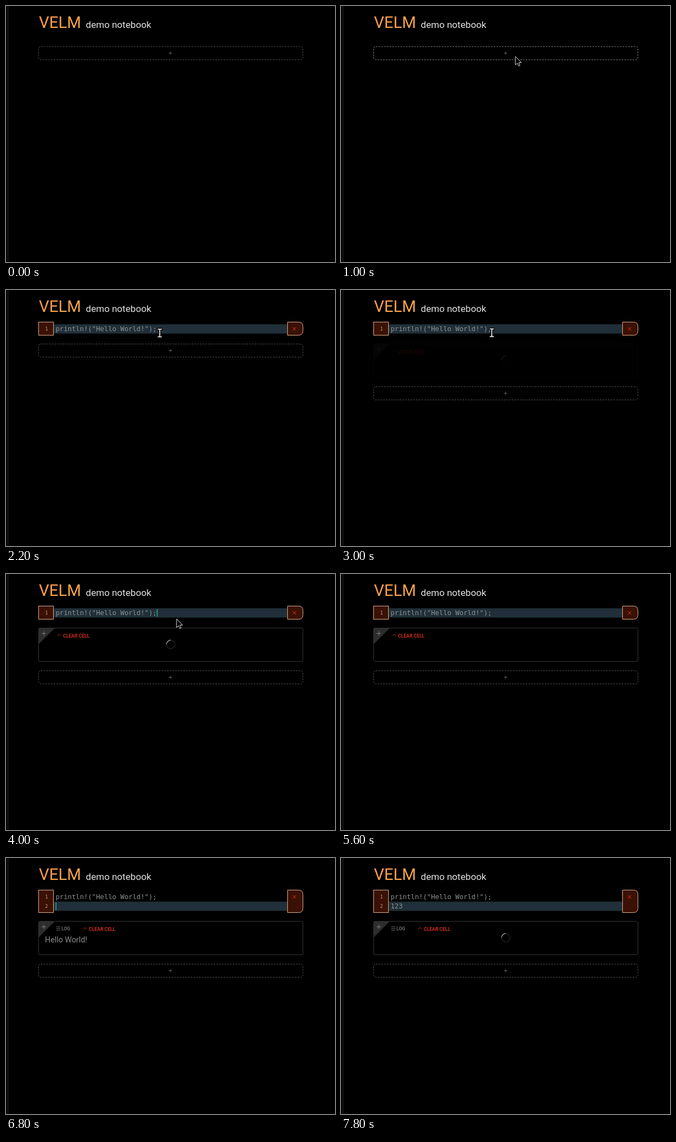
An HTML page for the animation above (8 s loop, 600 px wide and 467 px high).

```html
<!DOCTYPE html>
<html lang="en">
<head>
<meta charset="utf-8">
<title>Demo notebook</title>
<style>
  html, body { margin: 0; width: 100%; height: 100%; overflow: hidden; background: #000; }
  svg { display: block; width: 100%; height: 100%; }
  text { font-family: Roboto, "Open Sans", sans-serif; white-space: pre; }
  .mono { font-family: "DejaVu Sans Mono", monospace; font-size: 12.28px; fill: #8b918f; }
  .num { font-family: "DejaVu Sans Mono", monospace; font-size: 8px; fill: #c9a38c; text-anchor: middle; }
  .label { font-size: 8.6px; font-weight: 700; }
  .line { fill: none; stroke-width: 1; }
  .box { fill: #3a1104; stroke: #dfae88; }
  .hidden { display: none; }
</style>
</head>
<body>
<svg viewBox="0 0 600 467" preserveAspectRatio="none">
  <defs>
    <linearGradient id="warm" x1="0" x2="1" y1="0" y2="1">
      <stop offset="0" stop-color="#ff9650"/>
      <stop offset="1" stop-color="#f6ad45"/>
    </linearGradient>
  </defs>
  <rect width="600" height="467"/>
  <path class="line" d="M3.5 0V467" stroke="#2b2b2b"/>
  <text x="60" y="40" font-size="29.4" fill="url(#warm)">VELM</text>
  <text x="145.5" y="40" font-size="17.1" fill="#e2e2e2">demo notebook</text>

  <g id="editor">
    <rect id="active" x="87" width="426" height="17" fill="#202f39"/>
    <rect id="gutter" class="box" x="59.5" y="58.5" width="27"/>
    <path id="closer" class="box"/>
    <path class="line" d="M523 67.8l6 6m0-6l-6 6" stroke="#e8361f" stroke-width="1.2"/>
    <text class="num" x="74" y="74">1</text>
    <text class="num" id="num2" x="74" y="91">2</text>
    <text class="mono" x="90.4" y="75">println!("Hello World!");</text>
    <text class="mono" id="code2" x="90.4" y="92"></text>
    <rect id="caret" width="1.2" height="14" fill="#35c39a"/>
  </g>

  <g id="output">
    <rect class="line" x="59.5" y="98.5" width="482" height="61" rx="2.5" stroke="#353535"/>
    <path d="M60 98.5H89L60 127.5Z" fill="#2d2d2d"/>
    <path class="line" d="M65 108.5h8m-4-4v8" stroke="#808080"/>
    <g id="log" fill="#696969">
      <path class="line" d="M91.5 108.5h7.5m-7.5 3h7.5m-7.5 3h7.5" stroke="#696969"/>
      <text class="label" x="101" y="114.6">LOG</text>
    </g>
    <g id="clear">
      <path class="line" d="M94 112.8l3-3l3 3" stroke="#cf2d20"/>
      <text class="label" x="104" y="116.3" fill="#cf2d20">CLEAR CELL</text>
    </g>
    <text id="result" x="71" y="137" font-size="14.25" fill="#8c8c8c">Hello World!</text>
    <g id="spinner" class="line">
      <circle cx="300.5" cy="128.5" r="7.8" stroke="#343434"/>
      <path d="M292.7 128.5A7.8 7.8 0 0 1 300.5 120.7" stroke="#a9a9a9" stroke-width="1.2"/>
    </g>
  </g>

  <g id="adder" class="line">
    <rect id="frame" x="59.5" y="0" width="482" height="24" rx="4" stroke-dasharray="3 2"/>
    <path d="M297 12h6m-3-3v6" stroke="#606060"/>
  </g>

  <path id="arrow" d="M0 0V15.6L3.6 12.3L6 17.5L8.4 16.4L6.1 11.2H11Z" fill="#000" stroke="#e4e4e4" stroke-linejoin="round"/>
  <g id="beam" fill="none" stroke-linecap="square">
    <path d="M-3-7H3M0-7V7M-3 7H3" stroke="#000" stroke-width="4"/>
    <path d="M-3-7H3M0-7V7M-3 7H3" stroke="#fff" stroke-width="1.6"/>
  </g>
</svg>
<script>
  const LOOP = 8000, STEP = 200, ROW = 17;
  const $ = id => document.getElementById(id);
  const set = (id, attrs) => {
    for (const key in attrs) $(id).setAttribute(key, attrs[key]);
  };
  const show = (id, on) => $(id).classList.toggle("hidden", !on);
  const move = (id, x, y) => set(id, { transform: `translate(${x} ${y})` });
  const clamp = v => Math.max(0, Math.min(1, v));

  // Pointer stops: time, x, y
  const stops = [
    [200, 430, 372], [600, 368, 205], [1000, 318, 92], [1200, 315, 88],
    [1400, 315, 88], [1800, 296, 80], [2400, 275, 78], [3000, 275, 78],
    [3600, 300, 30], [4000, 311, 82], [4600, 324, 19], [5000, 278, 68], [5200, 275, 71]
  ];

  function pointer(t) {
    let i = 0;
    while (i < stops.length - 2 && t >= stops[i + 1][0]) i++;
    const [t0, x0, y0] = stops[i], [t1, x1, y1] = stops[i + 1];
    const p = clamp((t - t0) / (t1 - t0)), k = p * p * (3 - 2 * p);
    return [x0 + (x1 - x0) * k, y0 + (y1 - y0) * k];
  }

  function drawPointer(t) {
    const on = t >= 200 && t < 5400;
    const [x, y] = pointer(t);
    const overText = t >= 1400 && y > 62 && y < 80.5;
    show("arrow", on && !overText);
    show("beam", on && overText);
    move("arrow", x, y);
    move("beam", x, y);
  }

  function drawEditor(t, two) {
    const bottom = two ? 99.5 : 82.5;
    show("editor", t >= 1400);
    set("active", { y: two ? 79.5 : 62.5 });
    set("gutter", { height: bottom - 58.5 });
    set("closer", { d: `M513.5 58.5H533.5Q541.5 58.5 541.5 66.5V${bottom - 8}Q541.5 ${bottom} 533.5 ${bottom}H513.5Z` });
    show("num2", two);
    $("code2").textContent = t >= 7200 ? "123" : t >= 7000 ? "1" : "";
    const blink = t >= 3800 && t <= 6000 && Math.floor((t - 3800) / 600) % 2 === 0;
    show("caret", blink || (two && t < 7800));
    const typed = $("code2").textContent.length;
    set("caret", { x: two ? 90.6 + typed * 7.4 : 275, y: two ? 81 : 64 });
  }

  function drawOutput(t, shift) {
    const logged = t >= 6000;
    show("output", t >= 3000);
    set("output", { opacity: clamp(0.12 + (t - 3000) / 500) });
    move("output", 0, shift);
    show("log", logged);
    move("clear", logged ? 47 : 0, 0);
    show("result", logged && t < 7800);
    show("spinner", t < 4800 || t >= 7800);
    const turn = (t - (t >= 7800 ? 7800 : 3000)) * 0.36;
    set("spinner", { transform: `rotate(${turn} 300.5 128.5)` });
  }

  function draw(ms) {
    const t = Math.floor(ms % LOOP / STEP) * STEP;
    const two = t >= 6800, shift = two ? ROW : 0;
    const hover = t >= 1000 && t < 1600;
    drawEditor(t, two);
    drawOutput(t, shift);
    move("adder", 0, t < 1400 ? 74 : t < 3000 ? 98.5 : 176.5 + shift);
    set("frame", { stroke: hover ? "#868686" : "#505050" });
    drawPointer(t);
  }

  let start;
  function tick(now) {
    start ??= now;
    draw(now - start);
    requestAnimationFrame(tick);
  }
  draw(0);
  requestAnimationFrame(tick);
</script>
</body>
</html>
```
